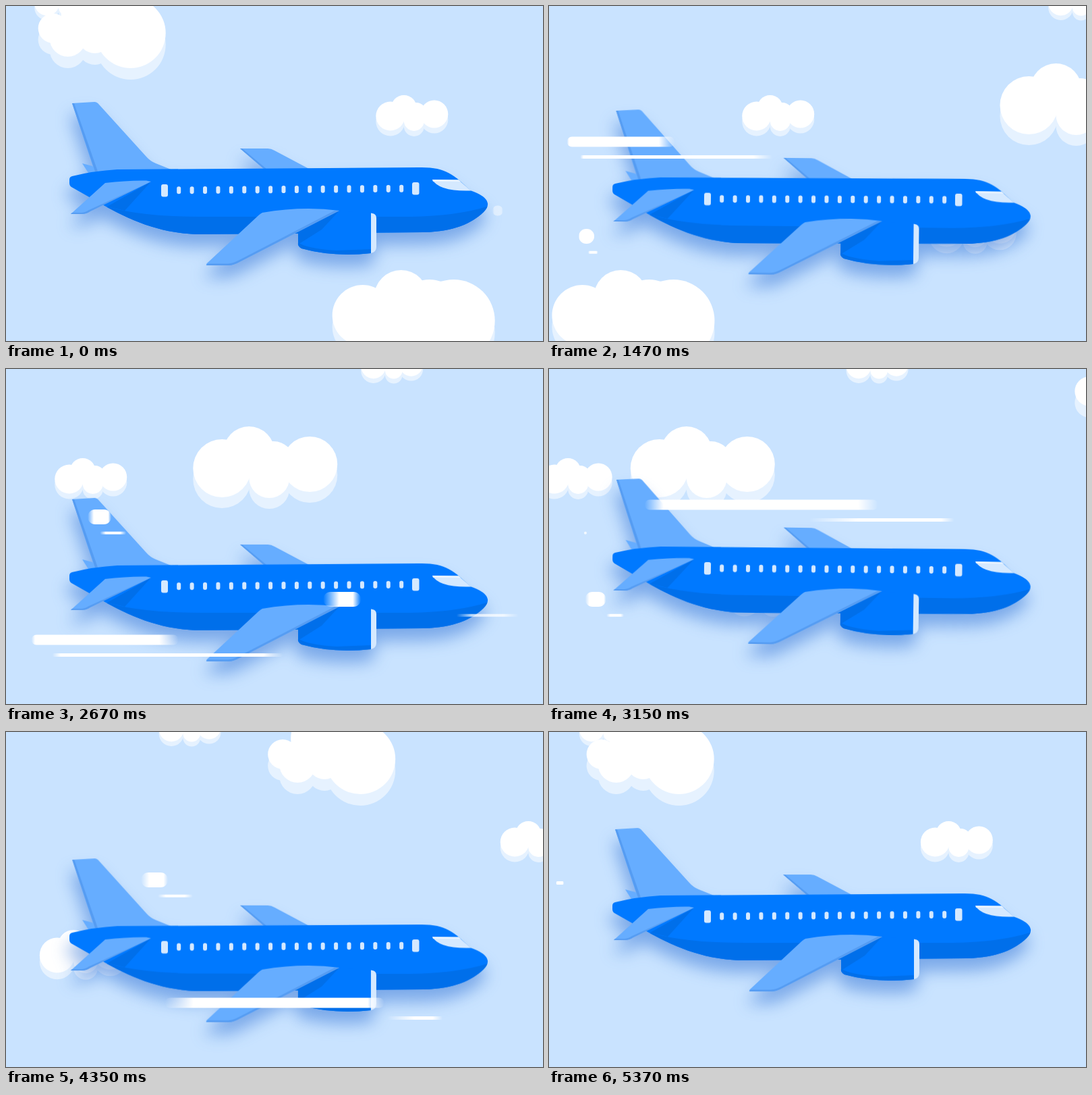
An HTML page that plays this animation: 796x496 px, repeating every 5400 ms.

```html
<!DOCTYPE html>
<html lang="en">
<head>
<meta charset="utf-8">
<title>Plane in the clouds</title>
<style>
  html, body { margin: 0; width: 100%; height: 100%; overflow: hidden; background: #c9e3ff; }
  svg { position: absolute; left: 0; top: 0; }
  #plane { filter: drop-shadow(-3px 18px 12px rgba(35, 105, 210, .48)); }
  .streak { position: absolute; left: 0; top: 0; }
  .body { fill: #0079ff; }
  .dark { fill: #006fea; }
  .wing { fill: #66adff; }
  .edge { fill: #559cf2; }
  .glass { fill: #d5e9ff; }
</style>
</head>
<body>
<svg width="796" height="496" viewBox="0 0 796 496">
  <defs>
    <g id="puffs">
      <circle cx="22" cy="31" r="21.5"/><circle cx="42" cy="19" r="19"/>
      <circle cx="57" cy="38" r="15"/><circle cx="60" cy="27" r="16"/>
      <circle cx="87" cy="28" r="20.5"/>
    </g>
    <g id="bigPuffs">
      <circle cx="45" cy="67" r="45"/><circle cx="102" cy="40" r="40"/>
      <circle cx="144" cy="64" r="50"/><circle cx="100" cy="90" r="45"/>
      <circle cx="180" cy="75" r="61"/>
    </g>
    <g id="topPuffs">
      <circle cx="22" cy="33" r="22"/><circle cx="44" cy="48" r="27"/>
      <circle cx="84" cy="45" r="25"/><circle cx="92" cy="10" r="58"/>
      <circle cx="137" cy="40" r="52"/>
    </g>
    <g id="cloud" fill="#fff"><use href="#puffs" y="8" opacity=".55"/><use href="#puffs"/></g>
    <g id="bigCloud" fill="#fff"><use href="#bigPuffs" y="17" opacity=".55"/><use href="#bigPuffs"/></g>
    <g id="topCloud" fill="#fff"><use href="#topPuffs" y="17" opacity=".55"/><use href="#topPuffs"/></g>
    <clipPath id="hull"><use href="#fuselage"/></clipPath>
  </defs>
  <g id="back"></g>
  <g id="plane">
    <path class="wing" d="M113 233L128 237L136 247H122Z"/>
    <path class="wing" d="M98 144L131 142Q135 142 138 146L207 222Q214 230 222 233L247 243L132 247Z"/>
    <path class="edge" d="M98 144L101 144L136 245H132Z"/>
    <path class="wing" d="M347 211H388Q393 211 398 214L449 241H382Z"/>
    <path class="edge" d="M347 211L350 211L386 241H382Z"/>
    <path id="fuselage" class="body" d="M98 252Q130 244 165 242L612 239C650 238 664 249 688 273Q712 281 714 292Q715 298 708 305C690 322 664 334 620 335L290 338C235 338 190 320 150 298L97 268Q94 266 94 262V257Q94 253 98 252Z"/>
    <g clip-path="url(#hull)">
      <path class="dark" d="M150 297Q200 312 290 312L600 312Q670 311 716 296V345H150Z"/>
      <path class="dark" d="M215 260L176 303L150 297Z"/>
    </g>
    <path class="glass" d="M632 257L671 257.500L689 273.500Q642 275 632 257Z"/>
    <path fill="#eaf4ff" d="M632 257L671 257.500L674 260Q650 260 633 260Z"/>
    <rect class="glass" x="230" y="264" width="10" height="18.500" rx="3"/>
    <rect class="glass" x="602" y="261" width="10.500" height="18.500" rx="3"/>
    <g id="windows" class="glass"></g>
    <path class="wing" d="M147 262Q180 258 208 258.500L215 260L125 304Q119 308 113 308H96Z"/>
    <path class="edge" d="M215 260L125 304Q119 308 113 308H96L98 306H111Q117 306 123 302Z"/>
    <path class="body" d="M433 335L494 303L541 306.500V366Q485 372 438 359Q432 356 433 350Z"/>
    <path class="dark" d="M494 303L468 331L433 353V333Z"/>
    <path class="dark" d="M433 350Q445 359 490 362L541 360V366Q485 372 438 359Q432 356 433 350Z"/>
    <path class="glass" d="M541 306.500L545 307.500Q549 309 549 314V357Q549 364 541 366Z"/>
    <path class="wing" d="M380 306Q440 296 494 303L346 379Q337 384 330 384H297Q296 382 300 379L370 314Q376 308 380 306Z"/>
    <path class="edge" d="M494 303L346 379Q337 384 330 384H297L299 381.500H329Q336 381 344 377L487 303Z"/>
  </g>
  <g id="front"></g>
</svg>
<script>
const LOOP = 5400, CYCLE = 1800;
const SLOW = 0.1783, FAST = 0.326;
const SVG = 'http://www.w3.org/2000/svg';
const $ = id => document.getElementById(id);
const clamp = v => Math.min(1, Math.max(0, v));
const cycleTime = (t, start, lead = 0) => (t - start + lead + 2 * CYCLE) % CYCLE - lead;

function add(parent, tag, attrs) {
  const el = document.createElementNS(SVG, tag);
  for (const key in attrs) el.setAttribute(key, attrs[key]);
  return parent.appendChild(el);
}

for (let i = 0; i < 18; i++) {
  add($('windows'), 'rect', { x: 253.2 + i * 19.41, y: 267.3 - i * 0.15, width: 6, height: 11, rx: 2.8 });
}

// exit: x below which a cloud re-enters, shifted right by wrap
const clouds = [
  { shape: 'cloud', x: 825, y: 293, scale: 1.21, speed: SLOW },
  { shape: 'cloud', x: 548, y: 132, scale: 1, speed: SLOW, exit: -110, wrap: 960 },
  { shape: 'cloud', x: 42, y: -31, scale: 0.86, speed: SLOW, exit: -95, wrap: 960 },
  { shape: 'cloud', x: 1147, y: 85, scale: 2, speed: FAST },
  { shape: 'topCloud', x: 48, y: 0, scale: 1, speed: FAST, exit: -200, wrap: 1758.6 },
  { shape: 'bigCloud', x: 484, y: 391, scale: 1, speed: FAST, exit: -250, wrap: 1757.6, layer: 'front' }
];
for (const c of clouds) c.el = add($(c.layer || 'back'), 'use', { href: '#' + c.shape });

function moveCloud(c, t) {
  let x = c.x - c.speed * t;
  if (x < c.exit) x += c.wrap;
  c.el.setAttribute('transform', `translate(${x} ${c.y}) scale(${c.scale})`);
}

function makeStreak() {
  const el = document.createElement('div');
  el.className = 'streak';
  return document.body.appendChild(el);
}

function drawStreak(el, left, right, y, r, alpha, softL, softR) {
  el.style.opacity = alpha;
  if (!alpha) return;
  const w = right - left + 2 * r;
  const a = Math.min(softL, w / 2), b = Math.min(softR, w / 2);
  Object.assign(el.style, {
    width: w + 'px',
    height: 2 * r + 'px',
    borderRadius: r + 'px',
    transform: `translate(${left - r}px, ${y - r}px)`,
    background: `linear-gradient(90deg, rgba(255,255,255,0), #fff ${a}px, #fff ${w - b}px, rgba(255,255,255,0))`
  });
}

// A line whose head and tail follow separate S-curves towards a drifting end
const curve = (base, drift, span, k, mid) => s => base - drift * s + span / (1 + Math.exp(k * (s - mid)));
const barHead = curve(57, 0.08, 678, 0.024, 194), barTail = curve(57, 0.08, 678, 0.0157, 302);
const lineHead = curve(72, 0.087, 690, 0.035, 260), lineTail = curve(72, 0.087, 690, 0.014, 358);
const blur = (f, s) => Math.abs(f(s - 6) - f(s + 6));

function drawLine(el, s, head, tail, y, r, alpha) {
  drawStreak(el, head(s), Math.max(head(s), tail(s)), y, r, alpha, blur(head, s), blur(tail, s));
}

const bars = [[0, 303], [522, 401], [1090, 201]].map(([start, y]) =>
  ({ start, y, bar: makeStreak(), line: makeStreak() }));

function moveBar(b, t) {
  const s = cycleTime(t, b.start, 30);
  const barAlpha = clamp((s + 30) / 70) * clamp((560 - s) / 80);
  const lineAlpha = clamp((s - 40) / 60) * clamp((700 - s) / 15);
  drawLine(b.bar, s, barHead, barTail, b.y, 7.5, barAlpha);
  drawLine(b.line, s, lineHead, lineTail, b.y + 22.5, 2.5, lineAlpha);
}

const dots = [[390, 219, 957, 35], [760, 341, 820, 100]].map(([start, y, time, lag]) =>
  ({ start, y, time, lag, dot: makeStreak(), dash: makeStreak() }));

function moveDot(d, t) {
  const s = cycleTime(t, d.start);
  const rest = v => Math.pow(1 - clamp(v / d.time), 3);
  const alpha = v => clamp(v / 15) * clamp((d.time - v) / 40);
  const place = f => 54 + 687 * f;

  const f = rest(s), half = (40 * f + 8 * clamp(f * 50)) / 2;
  drawStreak(d.dot, place(f) - half, place(f) + half, d.y, 11, alpha(s), half * 1.4, half * 0.7);

  const g = rest(s - d.lag), dash = 45 * Math.sqrt(g);
  drawStreak(d.dash, place(g) - dash, place(g) + dash, d.y + 23.5, 1.8, alpha(s - d.lag), dash * 0.5, dash * 0.5);
}

function movePlane(t) {
  const a = 2 * Math.PI * t / CYCLE;
  const y = 24.5 * (1 - Math.cos(a));
  const tilt = 0.86 * Math.pow(Math.abs(Math.sin(a)), 3);
  $('plane').setAttribute('transform', `translate(0 ${y}) rotate(${tilt} 400 270)`);
}

function draw(t) {
  movePlane(t);
  clouds.forEach(c => moveCloud(c, t));
  bars.forEach(b => moveBar(b, t));
  dots.forEach(d => moveDot(d, t));
}

const begin = performance.now();
function tick() {
  draw((performance.now() - begin) % LOOP);
  requestAnimationFrame(tick);
}
tick();
</script>
</body>
</html>
```
